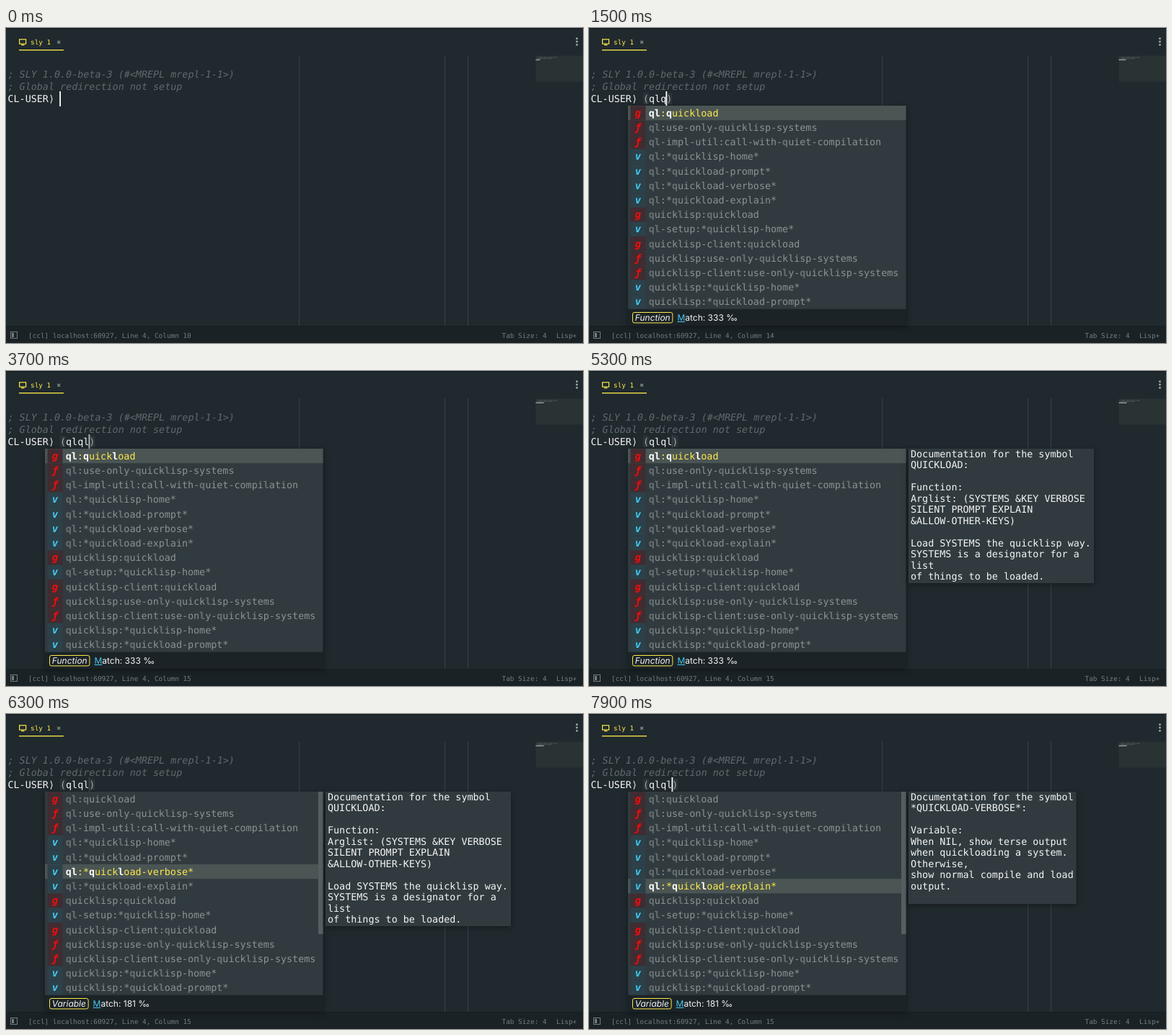
These frames come from a looping animation (800 px wide and 438 px high, 8000 ms). An HTML page with a canvas:

```html
<!DOCTYPE html>
<html lang="en">
<head>
<meta charset="utf-8">
<title>Lisp completion</title>
<style>
html, body { margin: 0; width: 100%; height: 100%; overflow: hidden; background: #20292e; }
canvas { display: block; width: 800px; height: 438px; }
</style>
</head>
<body>
<canvas id="stage"></canvas>
<script>
const LOOP = 8000;
const MONO = '"DejaVu Sans Mono", monospace';
const SANS = 'Inter, sans-serif';
const CODE = `13.4px ${MONO}`;
const SMALL = `9.4px ${MONO}`;
const ROW = 20.2, TOP = 108, LEFT = 54;
const YELLOW = '#fce94a', RED = '#f30c0c', CYAN = '#45c8ee', PURPLE = '#a585e0';

const canvas = document.getElementById('stage');
const ratio = window.devicePixelRatio || 1;
canvas.width = 800 * ratio;
canvas.height = 438 * ratio;
const ctx = canvas.getContext('2d');
ctx.scale(ratio, ratio);
ctx.textRendering = 'geometricPrecision';

const ICONS = {
  f: ['ƒ', RED, '#402c31'],
  g: ['g', RED, '#402c31'],
  s: ['ℒ', RED, '#39434b'],
  v: ['v', CYAN, '#2c4149'],
  t: ['t', PURPLE, '#3b3e4a'],
  p: ['…', PURPLE, '#3b3e4a'],
  c: ['…', CYAN, '#2c4149']
};

// Each entry: icon key, label, optional note.
const SHORT = {
  right: 505,
  items: [
    'f quit', 's quote|Special-op Fn', 'f ql:help', 'f ql:setup', 'f ql:qmerge',
    'f ql-ecl:lisp', 'f ql-scl:lisp', '- ql-ccl:lisp', 'f ql:dist-url',
    'p ql-http:url|Cla Fn', 't ql-impl:ecl', 't ql-impl:scl',
    'c ql-impl:ccl|Pak Cla', '- ql-impl:gcl'
  ]
};
const LONG = {
  right: 439.5,
  items: [
    'g ql:quickload', 'f ql:use-only-quicklisp-systems',
    'f ql-impl-util:call-with-quiet-compilation', 'v ql:*quicklisp-home*',
    'v ql:*quickload-prompt*', 'v ql:*quickload-verbose*', 'v ql:*quickload-explain*',
    'g quicklisp:quickload', 'v ql-setup:*quicklisp-home*', 'g quicklisp-client:quickload',
    'f quicklisp:use-only-quicklisp-systems', 'f quicklisp-client:use-only-quicklisp-systems',
    'v quicklisp:*quicklisp-home*', 'v quicklisp:*quickload-prompt*'
  ]
};

const DOCS = [
  { width: 257, height: 187, text: `Documentation for the symbol
QUICKLOAD:

Function:
Arglist: (SYSTEMS &KEY VERBOSE
SILENT PROMPT EXPLAIN
&ALLOW-OTHER-KEYS)

Load SYSTEMS the quicklisp way.
SYSTEMS is a designator for a
list
of things to be loaded.` },
  { width: 232.5, height: 156, text: `Documentation for the symbol
*QUICKLOAD-VERBOSE*:

Variable:
When NIL, show terse output
when quickloading a system.
Otherwise,
show normal compile and load
output.` }
];

const KEYS = [[300, '('], [600, '(q'], [1300, '(ql'], [1500, '(qlq'], [1700, '(qlql']];
const clamp = (x, a, b) => Math.min(b, Math.max(a, x));

function rect(x, y, w, h, color) {
  ctx.fillStyle = color;
  ctx.fillRect(x, y, w, h);
}

function text(str, x, y, color, font = CODE, align = 'left') {
  ctx.font = font;
  ctx.textAlign = align;
  ctx.fillStyle = color;
  ctx.fillText(str, x, y);
  return ctx.measureText(str).width;
}

function panel(x, y, w, h, color) {
  ctx.save();
  ctx.shadowColor = 'rgba(0,0,0,.35)';
  ctx.shadowBlur = 8 * ratio;
  ctx.shadowOffsetY = 2 * ratio;
  rect(x, y, w, h, color);
  ctx.restore();
}

// Positions of the typed letters inside a label.
function matches(label, query) {
  if (query.length < 3) return query === 'ql' && label[1] === 'l' ? [0, 1] : [0];
  const q = label.lastIndexOf('q');
  const l = label.startsWith('ql') ? 1 : label.lastIndexOf('l', q);
  return [0, l, q, query.length > 3 ? label.indexOf('l', q) : q];
}

function drawChrome() {
  rect(0, 0, 800, 438, '#20292e');
  rect(0, 0, 800, 1, '#10181d');
  for (const x of [406, 608, 640]) rect(x, 38, 1, 377, '#364147');

  ctx.strokeStyle = YELLOW;
  ctx.lineWidth = 1.2;
  ctx.strokeRect(18.6, 15.8, 9, 6.2);
  rect(21, 23, 4.5, 1.2, YELLOW);
  text('sly 1', 34, 23.4, YELLOW, SMALL);
  text('✖', 73.4, 23.4, '#7c8587', SMALL, 'center');
  rect(18, 30, 62, 1.3, YELLOW);

  ctx.fillStyle = '#a4aaab';
  for (const y of [14.7, 19, 23.3]) {
    ctx.beginPath();
    ctx.arc(791.5, y, 1.4, 0, 7);
    ctx.fill();
  }
}

function drawStatus(column) {
  rect(0, 415, 800, 23, '#1a2226');
  rect(0, 414, 800, 1, '#182024');
  const gray = '#737d7f';
  ctx.strokeStyle = gray;
  ctx.lineWidth = 1;
  ctx.strokeRect(6.5, 422.5, 9, 9);
  rect(8, 424, 3, 6, gray);
  text(`[ccl] localhost:60927, Line 4, Column ${column}`, 31, 430.6, gray, SMALL);
  text('Tab Size: 4', 687.5, 430.6, gray, SMALL);
  text('Lisp+', 763, 430.6, gray, SMALL);
}

function drawMinimap(typed) {
  rect(734.5, 38.5, 65.5, 36, '#293334');
  for (let i = 0; i < 28; i++) {
    if (i % 7 !== 1) rect(736 + i, 40.5, 0.8, 1, '#59625f');
    if (i < 21 && i % 6 !== 1) rect(736 + i, 42.2, 0.8, 0.8, '#59625f');
  }
  rect(734.5, 43.6, 6 + typed.length, 1.2, '#aeb4b2');
}

function drawEditor(typed, caret) {
  const gray = '#606a6d', bracket = '#a1a7a8';
  text('; SLY 1.0.0-beta-3 (#<MREPL mrepl-1-1>)', 2.5, 68.8, gray, 'italic ' + CODE);
  text('; Global redirection not setup', 2.5, 85.8, gray, 'italic ' + CODE);
  text('CL-USER⟩', 2.5, 102.6, '#f4f5f5');
  let x = 75;
  if (typed) {
    rect(75, 90, 8, 16, '#2b3539');
    x += text('(', x, 102.6, bracket);
    x += text(typed.slice(1), x, 102.6, '#f4f5f5');
    rect(x, 90, 8, 16, '#2b3539');
    text(')', x, 102.6, bracket);
  }
  ctx.globalAlpha = caret;
  rect(x - 0.8, 88, 1.8, 21, '#fff');
  ctx.globalAlpha = 1;
}

function drawRow(entry, index, selected, query, right) {
  const [body, note] = entry.slice(2).split('|');
  const y = TOP + index * ROW, base = y + 14.8;
  if (selected) rect(LEFT, y, right - LEFT, ROW, '#4a5554');

  const icon = ICONS[entry[0]];
  if (icon) {
    const [glyph, color, back] = icon;
    rect(57.5, y + 0.3, 21, ROW - 0.6, back);
    if (entry[0] === 's') text(glyph, 67.2, base - 0.4, '#b9d5ef', `bold italic 14px ${MONO}`, 'center');
    text(glyph, 68, base, color, `bold italic 14px ${MONO}`, 'center');
  }

  const hits = matches(body, query);
  let x = 82.7;
  [...body].forEach((ch, i) => {
    const hit = hits.includes(i);
    const color = selected ? (hit ? '#fff' : YELLOW) : hit ? '#687174' : '#8b9293';
    x += text(ch, x, base, color, hit ? 'bold ' + CODE : CODE);
  });
  if (note) text(note, right - 4, base, '#727b7d', 'italic ' + CODE, 'right');
}

function drawFooter(kind, score) {
  const y = 406.6, font = `12px ${SANS}`;
  const w = text(kind, 63.8, y, '#f4f5f5', 'italic ' + font);
  ctx.strokeStyle = YELLOW;
  ctx.lineWidth = 1;
  ctx.beginPath();
  ctx.roundRect(60.5, 395.5, w + 6.5, 14.5, 2.5);
  ctx.stroke();
  const x = 60.5 + w + 13;
  const m = text('M', x, y, CYAN, font);
  rect(x, 408, m, 1, CYAN);
  text(`atch: ${score} ‰`, x + m, y, '#f4f5f5', font);
}

function drawPopup(list, query, row, bar) {
  const w = list.right - LEFT, h = list.items.length * ROW;
  panel(LEFT, TOP, w, 306, '#1b2327');
  rect(LEFT, TOP, w, h, '#313b3f');
  list.items.forEach((entry, i) => drawRow(entry, i, i === row, query, list.right));
  ctx.globalAlpha = bar;
  rect(433, TOP, 6.5, 198, '#566063');
  ctx.globalAlpha = 1;
  const score = list === SHORT ? 250 : row ? 181 : 333;
  drawFooter(row > 2 ? 'Variable' : 'Function', score);
}

function drawDoc({ width, height, text: body }) {
  panel(443, TOP, width, height, '#313b3f');
  body.split('\n').forEach((line, i) => text(line, 446, 119.8 + i * 15.47, '#f4f5f5'));
}

function draw(t) {
  const typed = KEYS.reduce((last, [at, str]) => t >= at ? str : last, '');
  const query = typed.slice(1);
  const caret = t < 1900 ? 1 : 0.5 + 0.5 * Math.cos((t - 1900) / 1000 * 2 * Math.PI);
  const row = t >= 7700 ? 6 : clamp(Math.floor((t - 5500) / 150), 0, 5);
  const bar = t < 5650 ? 0 : t >= 7700 ? 1 : clamp((7500 - t) / 300, 0, 1);

  drawChrome();
  drawMinimap(typed);
  drawEditor(typed, caret);
  drawStatus(10 + typed.length);
  if (t >= 700) drawPopup(t < 1500 ? SHORT : LONG, query, row, bar);
  if (t >= 5000) drawDoc(DOCS[t < 6800 ? 0 : 1]);
}

const start = performance.now();
function tick() {
  draw((performance.now() - start) % LOOP);
  requestAnimationFrame(tick);
}
tick();
</script>
</body>
</html>
```
